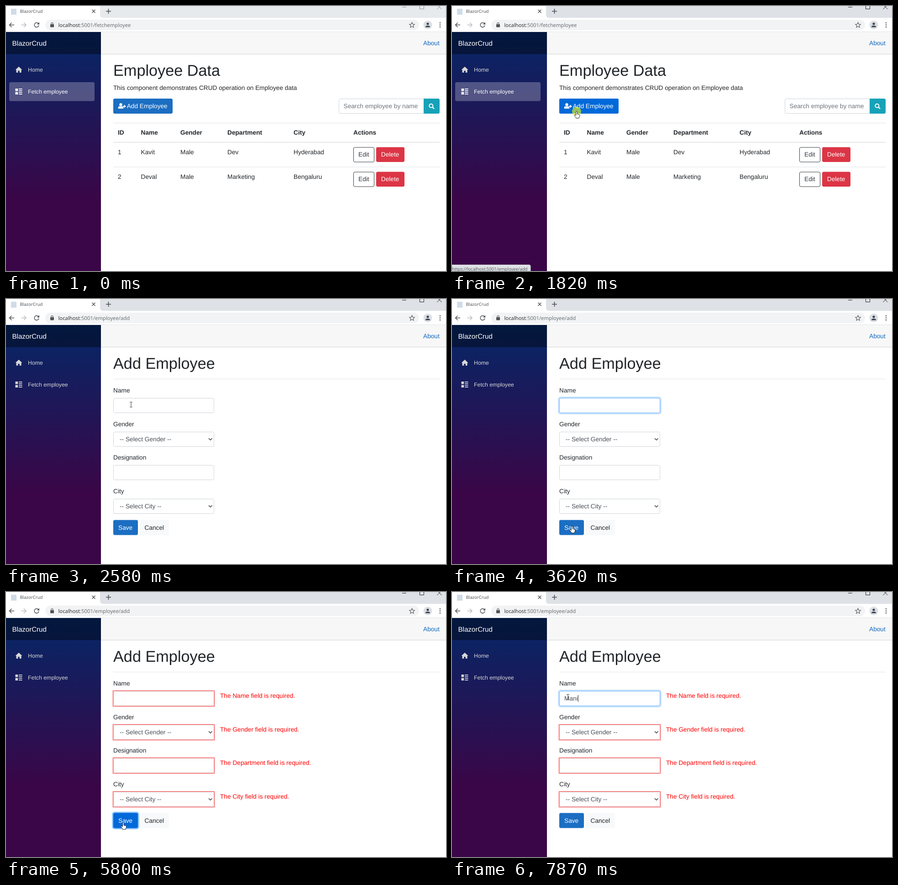
Write an HTML page that moves like this. It is 964x581 px and loops after 8000 ms.

```html
<!DOCTYPE html>
<html lang="en">
<head>
<meta charset="utf-8">
<title>Employee form</title>
<style>
  html, body { margin: 0; width: 100%; height: 100%; overflow: hidden; background: #fff; }
  svg { display: block; }
  text { font-family: "Liberation Sans", Arial, sans-serif; font-size: 13.7px; fill: #212529;
         text-rendering: geometricPrecision; white-space: pre; }
  .ui { font-family: "Open Sans", "Noto Sans", sans-serif; }
  .line { fill: none; stroke-linecap: butt; }
</style>
</head>
<body>
<svg id="stage" width="964" height="581" viewBox="0 0 964 581" xmlns="http://www.w3.org/2000/svg"></svg>
<script>
const LOOP = 8000;
const BLUE = '#1b6ec2', HOVER = '#0069d9', FIELD = '#ced4da', RULE = '#dee2e6';

const text = (x, y, s, attrs = '') => `<text x="${x}" y="${y}" ${attrs}>${s}</text>`;
const rect = (x, y, w, h, fill, attrs = '') =>
  `<rect x="${x}" y="${y}" width="${w}" height="${h}" fill="${fill}" ${attrs}/>`;
const box = (x, y, w, h, stroke, fill = '#fff') =>
  rect(x + .5, y + .5, w - 1, h - 1, fill, `rx="3" stroke="${stroke}"`);
const line = (d, color, width = 1, attrs = '') =>
  `<path class="line" d="${d}" stroke="${color}" stroke-width="${width}" ${attrs}/>`;
const white = 'style="fill:#fff"';
const size = (px, color) => `style="font-size:${px}px;fill:${color}"`;

const browser = `
  ${rect(0, 0, 964, 27, '#e7eaed', 'id="strip"')}
  <path d="M0 0H206V19Q206 26 213 26H964V57H0Z" fill="#fff"/>
  ${rect(11, 6, 12, 13, '#cfdce8')}
  ${text(30.5, 15.3, 'BlazorCrud', `class="ui" ${size(9.6, '#45494d')}`)}
  ${line('M188.5 8l7 7m0-7l-7 7', '#45494d', 1.3)}
  ${line('M219 11.5h11M224.5 6v11', '#45494d', 1.5)}
  <g id="controls" stroke="#8f9294">
    <path class="line" d="M868 2.5h9M906.5 0v6.5h9V0M944.5-3l10 10m0-10l-10 10"/>
  </g>
  ${line('M18 41.5H7.5m5-5l-5 5 5 5', '#4d5155', 1.5)}
  ${line('M33.500 41.5H44m-5-5l5 5-5 5', '#b9bbbe', 1.4)}
  ${line('M71 38.300A5 5 0 1 0 72 42.500', '#4d5155', 1.5)}
  <path d="M73 35.500V40.500H68Z" fill="#4d5155"/>
  ${rect(86, 30, 819, 23, '#f1f3f4', 'rx="11.5"')}
  ${rect(97, 40, 8, 6.500, '#4d5155', 'rx="1"')}
  ${line('M99 40V38.500a2 2 0 0 1 4 0V40', '#4d5155', 1.2)}
  <text class="ui" x="114.500" y="45.700" ${size(11.33, '#63676b')}><tspan fill="#202124">localhost</tspan>:5001/<tspan id="route"></tspan></text>
  ${line('M889.500 36l1.600 3.800 4.100.4-3.100 2.700.9 4-3.500-2.100-3.500 2.100.9-4-3.100-2.700 4.100-.4Z', '#4d5155', 1.1)}
  <circle cx="924" cy="41.500" r="9.500" fill="#dcdfe4"/>
  <circle cx="924" cy="39" r="2.600" fill="#3c4350"/>
  <path d="M918.800 46.500q0-3.400 5.200-3.400t5.200 3.400Z" fill="#3c4350"/>
  ${[37, 41.5, 46].map(y => `<circle cx="951" cy="${y}" r="1.300" fill="#4d5155"/>`).join('')}
  ${rect(0, 56, 964, 1, '#e3e5e8')}`;

const layout = `
  ${rect(0, 57, 208, 524, 'url(#side)')}
  ${rect(0, 57, 208, 48.500, '#000', 'opacity=".4"')}
  ${text(13.5, 87, 'BlazorCrud', size(15.07, '#fff'))}
  ${rect(7, 167, 187, 41.500, '#fff', 'id="active" rx="3.500" opacity=".25"')}
  <path d="M28 133l-7.500 7h2v6h3.800v-4h3.400v4h3.800v-6h2Z" fill="#d7d7d7"/>
  ${text(48, 144, 'Home', size(12.33, '#d7d7d7'))}
  <g id="navLink" fill="#d7d7d7">
    <path transform="translate(20.500 181) scale(1.870)" d="M0 0v3h3V0zM4 0v1h4V0zM4 2v1h4V2zM0 4v3h3V4zM4 4v1h4V4zM4 6v1h4V6z"/>
    <text x="48" y="192" style="font-size:12.330px;fill:inherit">Fetch employee</text>
  </g>
  ${rect(208, 57, 756, 48, '#f7f7f7')}
  ${rect(208, 105, 756, 1, '#d6d5d5')}
  ${text(914, 85.700, 'About', 'style="fill:#1169c0"')}`;

const columns = [245, 295.5, 382, 485, 630, 761];
const cells = (values, y, attrs) => values.map((v, i) => text(columns[i], y, v, attrs)).join('');
const actions = y => box(761, y, 46, 33, '#343a40') + text(772, y + 20.700, 'Edit', 'style="fill:#343a40"') +
  rect(811, y, 62, 32.500, '#dc3545', 'rx="3.400"') + text(821.800, y + 20.700, 'Delete', white);

const listPage = `
  ${text(235, 153, 'Employee Data', size(34.25, '#212529'))}
  ${text(235, 183.700, 'This component demonstrates CRUD operation on Employee data')}
  ${rect(235, 203, 130, 33, BLUE, 'rx="3.400"')}
  ${rect(235, 203, 130, 33, HOVER, 'rx="3.400" id="addHover"')}
  <circle cx="251.500" cy="216.200" r="3.200" fill="#fff"/>
  <path d="M245.800 225v-2q0-3.200 3-3.200h5.400q3 0 3 3.200v2Z" fill="#fff"/>
  ${line('M256.500 220h6M259.500 217v6', '#fff', 2)}
  ${text(264.700, 224, 'Add Employee', white)}
  ${box(729, 203, 189, 33, FIELD)}
  ${text(739.500, 223.700, 'Search employee by name', 'style="fill:#6c757d"')}
  <path d="M915 203h31.500q3.500 0 3.500 3.500v26q0 3.500-3.500 3.500H915Z" fill="#17a2b8"/>
  <circle cx="931.300" cy="218.700" r="4" fill="none" stroke="#fff" stroke-width="2"/>
  ${line('M934.200 221.700l3.800 3.800', '#fff', 2.4)}
  ${rect(235, 256, 715, 1, RULE)}${rect(235, 298, 715, 1.600, RULE)}${rect(235, 352.500, 715, 1, RULE)}
  ${cells(['ID', 'Name', 'Gender', 'Department', 'City', 'Actions'], 282.300, 'font-weight="bold"')}
  ${cells(['1', 'Kavit', 'Male', 'Dev', 'Hyderabad'], 325)}
  ${cells(['2', 'Deval', 'Male', 'Marketing', 'Bengaluru'], 379)}
  ${actions(309.500)}${actions(363.500)}`;

const fields = [['Name', 'Name'], ['Gender', 'Gender', 1], ['Designation', 'Department'], ['City', 'City', 1]];
const tops = [217, 291, 364, 438];
const field = ([label, , select], i) => {
  const y = tops[i];
  return text(235, y - 12.300, label) + box(235, y, 221, 33, FIELD) + (select
    ? text(249, y + 21.400, `-- Select ${label} --`, 'style="fill:#495057"') +
      line(`M444 ${y + 14.500}l3.800 3.700 3.800-3.700`, '#343a40', 1.5)
    : '');
};
const outline = i => rect(234.5, tops[i] - .5, 222, 34, 'none', 'stroke="#f44" stroke-width="1.200"');

const formPage = `
  ${text(235, 153, 'Add Employee', size(34.25, '#212529'))}
  ${rect(235, 175, 715, 1, '#e5e5e5')}
  ${fields.map(field).join('')}
  <g id="errors">
    ${fields.map((f, i) => text(469, tops[i] + 15.200, `The ${f[1]} field is required.`, 'style="fill:#f00"')).join('')}
    ${[1, 2, 3].map(outline).join('')}
    <g id="nameError">${outline(0)}</g>
  </g>
  <g id="nameGlow">
    ${rect(233.6, 215.600, 223.800, 35.800, 'none', 'rx="4.500" stroke="#bfdeff" stroke-width="2.800"')}
    ${rect(235.5, 217.500, 220, 32, 'none', 'rx="3" stroke="#80bdff"')}
  </g>
  ${text(246, 238.400, '', 'id="typed" style="fill:#495057"')}
  ${rect(246, 226, 1, 15, '#343a40', 'id="caret"')}
  ${rect(233.6, 483.100, 56.800, 35.800, 'none', 'id="saveGlow" rx="4.500" stroke="#8cc5ff" stroke-width="2.800"')}
  ${rect(235, 484.500, 54, 33, BLUE, 'rx="3.400"')}
  ${rect(235, 484.500, 54, 33, HOVER, 'rx="3.400" id="saveHover"')}
  ${text(246, 505.500, 'Save', white)}
  ${rect(292.5, 484.500, 64.500, 33, '#f8f9fa', 'rx="3.400"')}
  ${text(303.5, 505.500, 'Cancel')}`;

const cursors = `
  <path id="arrow" d="M0 0V13.300L3 10.500 5 15 6.900 14.200 5 9.800H9.200Z" fill="#fff" stroke="#111" stroke-width=".8"/>
  <path id="beam" class="line" d="M-2.700-5.500H-.6L0-5 .6-5.500H2.700M0-5V5M-2.700 5.500H-.6L0 5 .6 5.500H2.700" stroke="#333"/>
  <path id="hand" d="M-1.400 1.300a1.400 1.400 0 0 1 2.800 0V6l1.200.2 1.800.4 1.400.5.9 1V11l-1.400 2.600V15H-1.300V13.800L-4 10.300-5.100 8.200q.5-1.600 2-.5L-1.400 9Z" fill="#fff" stroke="#111" stroke-width=".9"/>`;

document.getElementById('stage').innerHTML = `
  <defs><linearGradient id="side" gradientUnits="userSpaceOnUse" x1="0" y1="57" x2="0" y2="426">
    <stop stop-color="#052767"/><stop offset="1" stop-color="#3a0647"/>
  </linearGradient></defs>
  ${rect(0, 0, 964, 581, '#fff')}${browser}${layout}
  <g id="list">${listPage}</g><g id="form">${formPage}</g>
  <g id="status">
    <path d="M-1 567.500H169q3 0 3 3V582H-1Z" fill="#dee1e6" stroke="#c9ccd1"/>
    ${text(165.500, 579.500, 'https://localhost:5001/employee/add', `class="ui" text-anchor="end" ${size(9.6, '#4d5155')}`)}
  </g>
  <circle id="click" r="10" fill="#ffff00"/>
  <g id="pointer">${cursors}</g>`;

const el = {};
document.querySelectorAll('[id]').forEach(node => el[node.id] = node);

// [time, x, y] of the pointer hotspot
const path = [[510, 858, 580], [1310, 256, 238], [1350, 262, 235], [1450, 273, 231], [2420, 273, 231], [2540, 274, 231.5],
  [3150, 274, 231.5], [3580, 264, 494], [3620, 263, 498], [3760, 257, 506],
  [5800, 257, 506], [6030, 212, 390], [6290, 254, 230]];
const clicks = [1760, 2620, 3920, 6330];
const keys = [[7190, 'M'], [7390, 'Ma'], [7570, 'Man'], [7870, 'Mani']];
const caretOn = [[2620, 3150], [3680, 3920], [6330, 6880], [7190, LOOP]];
const MOVE_PAGE = 1900, INVALID = 4080;

const ramp = (t, start, length = 120) => Math.min(1, Math.max(0, (t - start) / length));
const pulse = (t, on, off) => {
  const up = ramp(t, on), down = ramp(t, off);
  return up * (2 - up) * (1 - down) ** 2;
};
const within = (t, [a, b]) => t >= a && t < b;
const show = (node, on) => node.setAttribute('visibility', on ? 'inherit' : 'hidden');
const fade = (node, amount) => node.setAttribute('opacity', amount);

function pointerAt(t) {
  const next = path.findIndex(p => p[0] > t);
  if (next < 1) return path[next < 0 ? path.length - 1 : 0].slice(1);
  const [t0, x0, y0] = path[next - 1], [t1, x1, y1] = path[next];
  const p = (t - t0) / (t1 - t0);
  const k = t1 - t0 > 300 ? p * p * (3 - 2 * p) : p;
  return [x0 + (x1 - x0) * k, y0 + (y1 - y0) * k];
}

function pointerKind(x, y, onForm) {
  const over = (left, top, right, bottom) => x >= left && x < right && y >= top && y < bottom;
  if (!onForm) return over(235, 203, 365, 236) ? 'hand' : 'arrow';
  if (over(235, 484, 289, 518)) return 'hand';
  return over(235, 217, 456, 250) || over(235, 364, 456, 397) ? 'beam' : 'arrow';
}

function render(t) {
  const onForm = t >= MOVE_PAGE, focused = t >= 1760;
  show(el.list, !onForm);
  show(el.form, onForm);
  show(el.active, !onForm);
  el.navLink.setAttribute('fill', onForm ? '#d7d7d7' : '#fff');
  el.route.textContent = onForm ? 'employee/add' : 'fetchemployee';
  el.strip.setAttribute('fill', focused ? '#dee1e6' : '#e7eaed');
  el.controls.setAttribute('stroke', focused ? '#222' : '#8f9294');

  fade(el.addHover, ramp(t, 1350));
  fade(el.status, ramp(t, 1470) * (1 - ramp(t, 2420)));
  fade(el.saveHover, pulse(t, 3630, 5830));
  fade(el.saveGlow, pulse(t, 3920, 6300));
  fade(el.nameGlow, t < 5000 ? pulse(t, 2620, 3920) : pulse(t, 6320, 9000));
  show(el.errors, t >= INVALID);
  show(el.nameError, t < 6330);

  el.typed.textContent = (keys.findLast(k => t >= k[0]) || [0, ''])[1];
  el.caret.setAttribute('x', 246 + Math.round(el.typed.getComputedTextLength()));
  show(el.caret, caretOn.some(span => within(t, span)));

  const [x, y] = pointerAt(t), kind = pointerKind(x, y, onForm);
  show(el.pointer, t >= path[0][0]);
  el.pointer.setAttribute('transform', `translate(${x} ${y})`);
  for (const name of ['arrow', 'beam', 'hand']) show(el[name], name === kind);

  const click = clicks.find(c => within(t, [c, c + 200]));
  show(el.click, click !== undefined);
  el.click.setAttribute('cx', x);
  el.click.setAttribute('cy', y);
  fade(el.click, click === undefined ? 0 : .6 * (1 - ramp(t, click + 120, 80)));
}

function tick(now) {
  render(now % LOOP);
  requestAnimationFrame(tick);
}
render(0);
requestAnimationFrame(tick);
</script>
</body>
</html>
```
